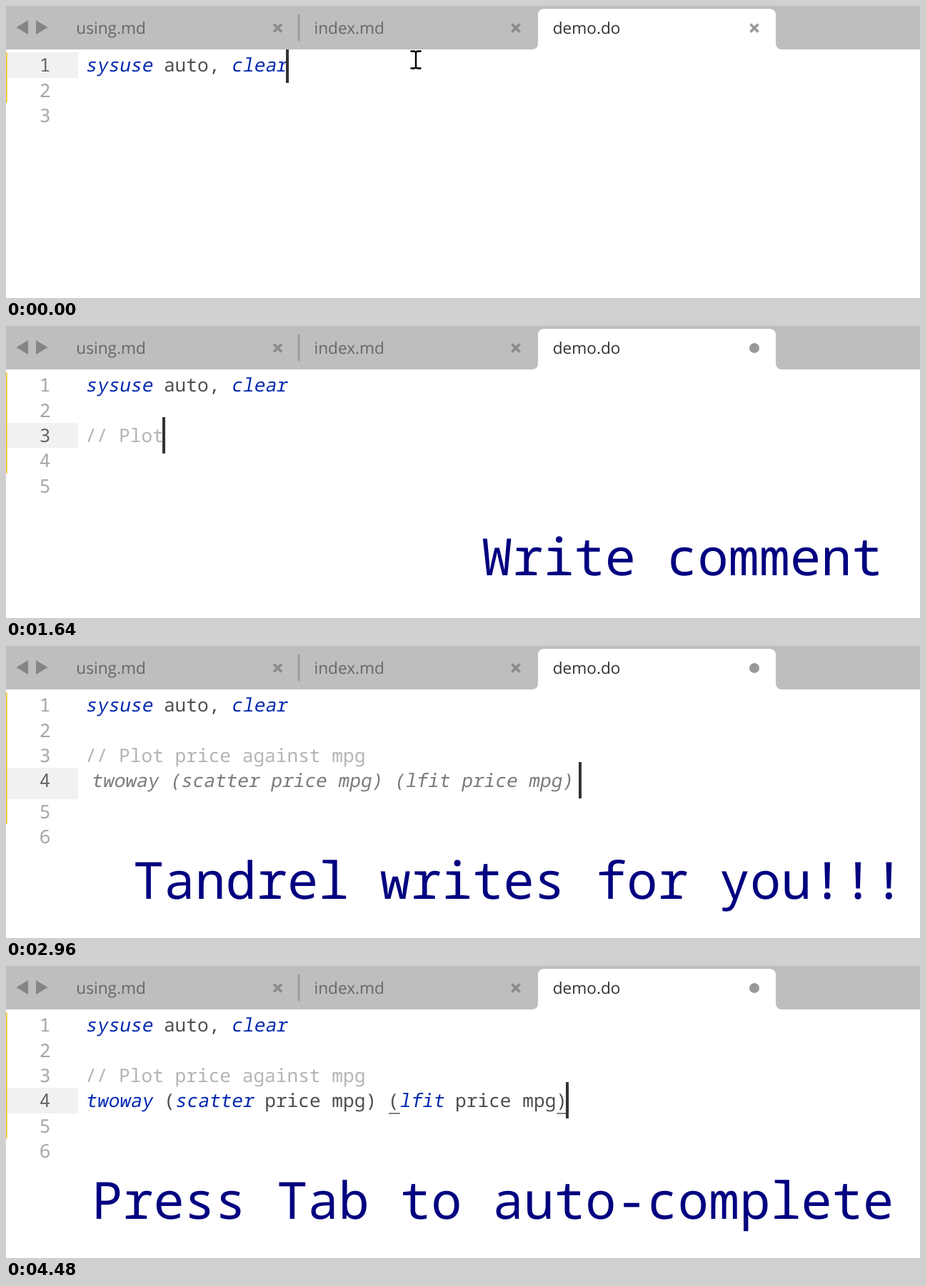
An HTML page with a canvas for the animation above (5.52 s loop, 1280x410 px).

```html
<!DOCTYPE html>
<html lang="en">
<head>
<meta charset="utf-8">
<title>Editor demo</title>
<style>
  html, body { margin: 0; width: 100%; height: 100%; overflow: hidden; background: #fff; }
  canvas { display: block; width: 1280px; height: 410px; }
</style>
</head>
<body>
<canvas id="stage" width="1280" height="410"></canvas>
<script>
const ctx = document.getElementById('stage').getContext('2d');
const LOOP = 5520;
const MONO = '"Noto Sans Mono", "DejaVu Sans Mono", monospace';
const CODE_FONT = `26.16px ${MONO}`;
const BIG_FONT = `72px ${MONO}`;
const TAB_FONT = '22.6px "Open Sans", "Noto Sans", sans-serif';
const CHAR = 15.7, LEFT = 111, TOP = 65.3, ROW = 35.3, EXTRA = 8;
const BLUE = '#0028b0', INK = '#4d4d4d', CARET = '#333';
const COMMENT = '// Plot price against mpg';
const COMMAND = 'twoway (scatter price mpg) (lfit price mpg)';

function rect(x, y, w, h, color) {
  ctx.fillStyle = color;
  ctx.fillRect(x, y, w, h);
}

function text(str, x, y, font, color, slant = 0) {
  ctx.save();
  ctx.font = font;
  ctx.textRendering = 'geometricPrecision';
  ctx.fillStyle = color;
  ctx.transform(1, 0, -slant, 1, x, y);
  ctx.fillText(str, 0, 0);
  ctx.restore();
}

const rowTop = n => Math.round(TOP + ROW * (n - 1));
const baseline = n => 92.4 + ROW * (n - 1);

function code(str, row, col, color, italic, shift = 0) {
  text(str, LEFT + col * CHAR + shift, baseline(row), CODE_FONT, color, italic ? 0.18 : 0);
}

// Keywords are slanted and blue, everything else is plain.
function highlighted(str, row) {
  let col = 0;
  for (const part of str.split(/\b(sysuse|clear|twoway|scatter|lfit)\b/)) {
    const keyword = /^(sysuse|clear|twoway|scatter|lfit)$/.test(part);
    code(part, row, col, keyword ? BLUE : INK, keyword);
    col += part.length;
  }
}

function caret(row, col, shift = 0) {
  rect(Math.round(LEFT - 2 + col * CHAR + shift), rowTop(row) - 8, 4, 51, CARET);
}

// extra is the added height of the active row.
function gutter(lines, active, extra = 0) {
  const top = rowTop(active);
  rect(0, top, 101, rowTop(active + 1) - top + extra, '#f1f1f1');
  rect(0, 65, 1.6, rowTop(lines) - 65 + extra, '#fcc21b');
  for (let n = 1; n <= lines; n++) {
    const y = baseline(n) + (n > active ? extra : 0);
    text(String(n), 46.7, y, CODE_FONT, n === active ? '#666' : '#a6a6a6');
  }
}

function triangle(tip, base) {
  ctx.fillStyle = '#858585';
  ctx.beginPath();
  ctx.moveTo(tip, 30);
  ctx.lineTo(base, 20);
  ctx.lineTo(base, 40);
  ctx.fill();
}

function cross(x, color) {
  const r = 5.5, y = 31;
  ctx.strokeStyle = color;
  ctx.lineWidth = 3.6;
  ctx.beginPath();
  ctx.moveTo(x - r, y - r);
  ctx.lineTo(x + r, y + r);
  ctx.moveTo(x + r, y - r);
  ctx.lineTo(x - r, y + r);
  ctx.stroke();
}

function tabs(modified) {
  rect(0, 0, 1280, 61, '#bebebe');
  triangle(14.5, 31);
  triangle(58.5, 42);
  rect(408.7, 12, 2.6, 37, '#999');

  ctx.fillStyle = '#fff';
  ctx.beginPath();
  ctx.moveTo(737, 61);
  ctx.arcTo(745, 61, 745, 53, 8);
  ctx.arcTo(745, 4, 753, 4, 8);
  ctx.arcTo(1078, 4, 1078, 12, 8);
  ctx.arcTo(1078, 61, 1086, 61, 8);
  ctx.lineTo(1086, 61);
  ctx.fill();

  text('using.md', 98.3, 39, TAB_FONT, '#666');
  text('index.md', 431.5, 39, TAB_FONT, '#666');
  text('demo.do', 765.7, 39, TAB_FONT, '#333');
  cross(380.5, '#8b8b8b');
  cross(714, '#8b8b8b');
  if (modified) {
    ctx.fillStyle = '#999';
    ctx.beginPath();
    ctx.arc(1048, 31, 7, 0, Math.PI * 2);
    ctx.fill();
  } else {
    cross(1048, '#999');
  }
}

function pointer(x, y) {
  ctx.strokeStyle = '#000';
  ctx.lineWidth = 2.4;
  ctx.beginPath();
  for (const s of [-1, 1]) {
    ctx.moveTo(x - 7.5, y + s * 12);
    ctx.lineTo(x - 2, y + s * 12);
    ctx.lineTo(x, y + s * 10.5);
    ctx.lineTo(x + 2, y + s * 12);
    ctx.lineTo(x + 7.5, y + s * 12);
  }
  ctx.moveTo(x, y - 10.5);
  ctx.lineTo(x, y + 10.5);
  ctx.stroke();
}

const big = (str, x, y) => text(str, x, y, BIG_FONT, '#000080');

// Typing speeds up slightly towards the end of the comment.
function typedCount(t) {
  if (t < 1520) return 0;
  const k = Math.floor((t - 1520) / 40);
  return k <= 9 ? Math.round(2 + k * 5 / 3) : Math.round(17 + (k - 9) * 8 / 3);
}

function draw(t) {
  rect(0, 0, 1280, 410, '#fff');
  const suggesting = t >= 2960 && t < 4480;

  if (t < 960) gutter(3, 1);
  else if (t < 1120) gutter(4, 2);
  else if (t < 2040) gutter(5, 3);
  else gutter(6, 4, suggesting ? EXTRA : 0);

  highlighted('sysuse auto, clear', 1);

  if (t < 960) {
    caret(1, 18);
  } else if (t < 1120) {
    caret(2, 0);
  } else if (t < 2040) {
    const count = typedCount(t);
    code(COMMENT.slice(0, count), 3, 0, '#b4b4b4');
    caret(3, count);
    if (t >= 1400) big('Write comment', 666, 350);
  } else {
    code(COMMENT, 3, 0, '#b4b4b4');
    if (t < 2960) {
      caret(4, 0);
      big('Wait and see...', 589, 350);
    } else if (suggesting) {
      code(COMMAND, 4, 0, '#7a7a7a', true, EXTRA);
      caret(4, COMMAND.length, EXTRA * 2 + 2);
      big('Tandrel writes for you!!!', 178, 355);
    } else {
      highlighted(COMMAND, 4);
      for (const col of [27, 42]) rect(LEFT + col * CHAR + 1, 206, CHAR, 2, '#808080');
      caret(4, COMMAND.length);
      big('Press Tab to auto-complete', 120, 355);
    }
  }

  tabs(t >= 960);

  if (t < 960) pointer(574, 75.5);
  if (t >= 4160 && t < 4480) {
    const p = Math.floor((t - 4160) / 40) / 7;
    pointer(663.5, 124.5 + 290 * p * p);
  }
}

const start = performance.now();
function tick() {
  draw((performance.now() - start) % LOOP);
  requestAnimationFrame(tick);
}
tick();
</script>
</body>
</html>
```
